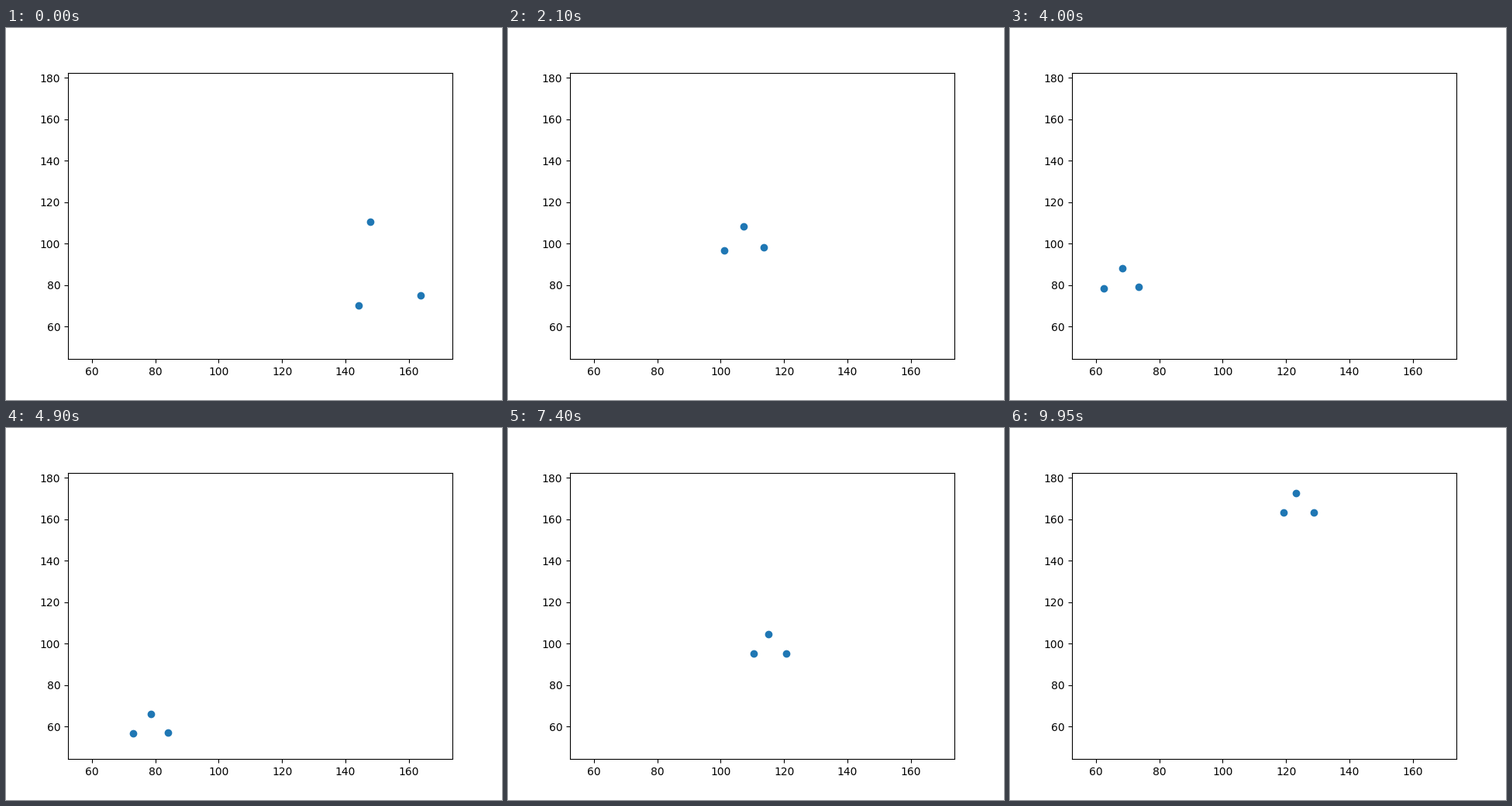
Write a matplotlib script that moves like this. It is 640 px wide and 480 px high and loops after 10 s.

```python
import numpy as np
import matplotlib.pyplot as plt
from matplotlib.animation import FuncAnimation

FRAMES, INTERVAL = 200, 50
XLIM, YLIM = (52.43, 173.8), (44.37, 182.54)
SETTLE = 47  # frames until the dots reach their formation

# Course of the group in stage pixels: time, x, y.
COURSE = np.array([
    (0, 495.2, 351.5), (12, 432.6, 340.4), (25, 377.1, 313.1),
    (42, 304.6, 285), (58, 217.6, 280.3), (68, 170.5, 296.8),
    (80, 143.6, 335.2), (94, 170.5, 385.6), (105, 221.5, 400.3),
    (115, 274.7, 394.2), (126, 317.5, 368.4), (148, 337.6, 291),
    (199, 372.75, 109.15),
])
TIMES, POINTS = COURSE[:, 0], COURSE[:, 1:]
SLOPES = np.gradient(POINTS, TIMES, axis=0, edge_order=2)


def mirrored(top, side):
    """Offsets of the top, right and left dot."""
    return np.array([top, side, np.negative(side)])


START = mirrored((-25, -101.3), (40, -6.5))
KICK = mirrored((-189, -190), (85, -82))
EARLY = mirrored((4, -25), (25, -1.5))
LATE = mirrored((-3.5, -24.8), (19.5, 0))


def hermite(s, a, b, slope_a, slope_b):
    ease = s * s * (3 - 2 * s)
    bend = s * (1 - s) * ((1 - s) * slope_a - s * slope_b)
    return a + (b - a) * ease + bend


def course(t):
    i = min(np.searchsorted(TIMES, t, side="right") - 1, len(TIMES) - 2)
    h = TIMES[i + 1] - TIMES[i]
    return hermite((t - TIMES[i]) / h, POINTS[i], POINTS[i + 1],
                   h * SLOPES[i], h * SLOPES[i + 1])


def formation(t):
    """Offsets that swing out, settle, then slowly draw together."""
    rest = EARLY + (LATE - EARLY) * t / (FRAMES - 1)
    return rest + hermite(min(t / SETTLE, 1), START - EARLY, 0, KICK, 0)


def dot_data(t):
    """Dot positions in axes data coordinates."""
    x, y = (course(t) + formation(t)).T
    return np.column_stack((np.interp(x, (80, 576), XLIM),
                            np.interp(y, (57.6, 427.2), YLIM[::-1])))


fig, ax = plt.subplots(figsize=(6.4, 4.8), dpi=100)
ax.set(xlim=XLIM, ylim=YLIM)
dots = ax.scatter(*dot_data(0).T)


def update(frame):
    dots.set_offsets(dot_data(frame))
    return (dots,)


anim = FuncAnimation(fig, update, frames=FRAMES, interval=INTERVAL, repeat=True)
plt.show()
```
